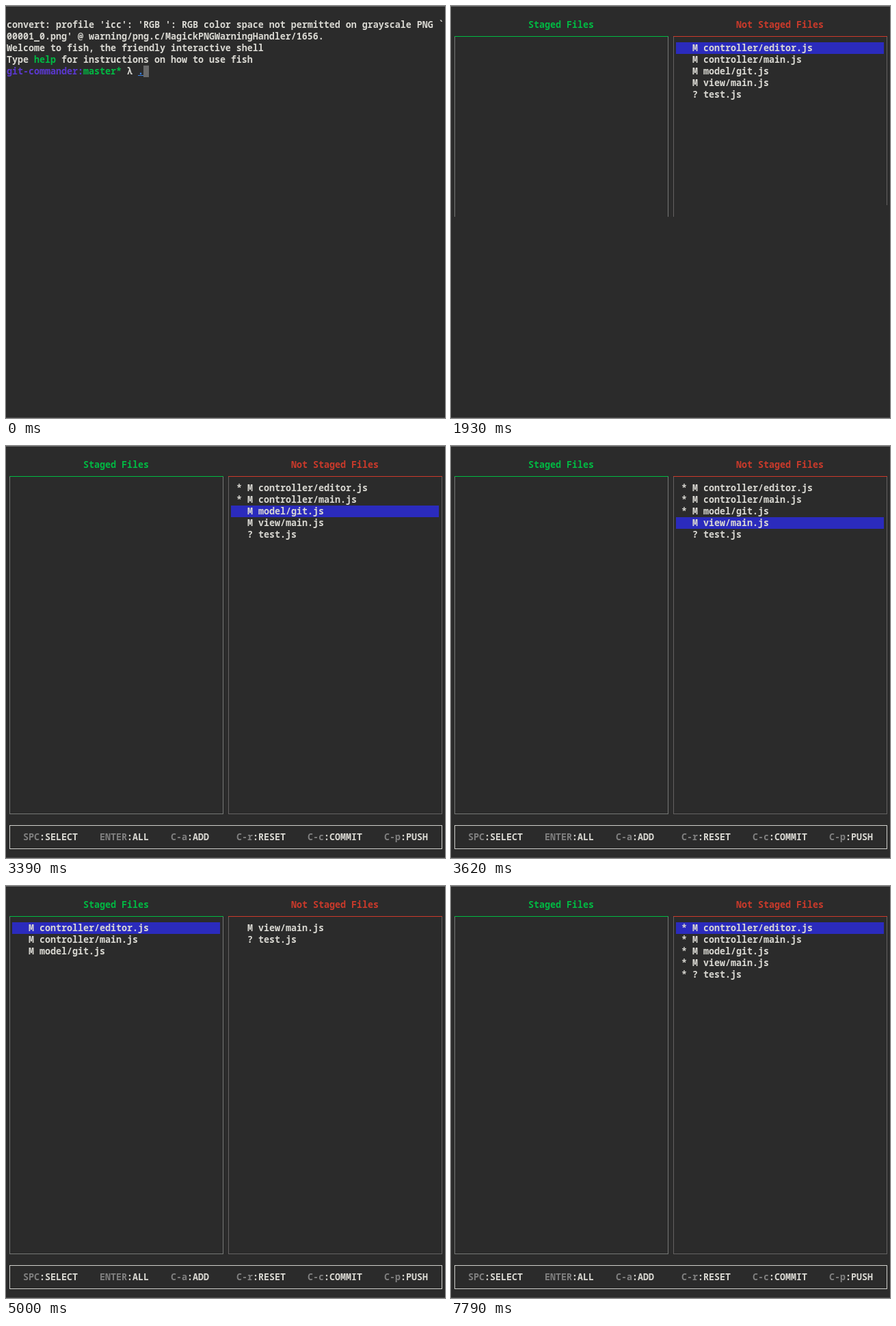
Animation of 642 by 602 pixels, one loop 8 s. Source, as an HTML page:

```html
<!DOCTYPE html>
<html lang="en">
<head>
<meta charset="utf-8">
<title>git-commander in a terminal</title>
<style>
  html, body { margin: 0; width: 100%; height: 100%; overflow: hidden; background: #2b2b2b; }
  svg { display: block; }
  text {
    font: 600 13.333px "Noto Sans Mono", "DejaVu Sans Mono", monospace;
    font-variant-ligatures: none;
    white-space: pre;
  }
</style>
</head>
<body>
<svg id="term" width="642" height="602" viewBox="0 0 642 602"></svg>
<script>
const LOOP = 8000, CW = 8, LH = 17;
const WHITE = '#d9d8d2', GREEN = '#00ba43', RED = '#cb3a2b', BLUE = '#3b82e4',
      PURPLE = '#5b38d0', GREY = '#808080', SELECT = '#2b2bbd', CURSOR = '#6a6a6a';
const term = document.getElementById('term');
const timed = [];

const colX = c => 1 + c * CW;
const rowY = r => 2 + r * LH;

// Adds an SVG element, visible from time a until time b.
function add(tag, attrs, a = 0, b = LOOP) {
  const el = document.createElementNS('http://www.w3.org/2000/svg', tag);
  for (const k in attrs) el.setAttribute(k, attrs[k]);
  term.append(el);
  if (a > 0 || b < LOOP) timed.push({ el, a, b });
  return el;
}

function rect(x, y, width, height, fill, a, b) {
  add('rect', { x, y, width, height, fill }, a, b);
}

function text(col, row, str, fill, a, b) {
  add('text', { x: colX(col), y: rowY(row) + 13, fill }, a, b).textContent = str;
}

function cells(col, row, n, fill, a, b) {
  rect(colX(col), rowY(row), n * CW, LH, fill, a, b);
}

// Window edges
rect(0, 0, 642, 1, '#686868');
rect(0, 601, 642, 1, '#484848');

// Shell
const UI = 1930;
[
  "convert: profile 'icc': 'RGB ': RGB color space not permitted on grayscale PNG `",
  "00001_0.png' @ warning/png.c/MagickPNGWarningHandler/1656.",
  'Welcome to fish, the friendly interactive shell',
  'Type      for instructions on how to use fish'
].forEach((line, i) => text(0, i + 1, line, WHITE, 0, UI));
text(5, 4, 'help', GREEN, 0, UI);
text(0, 5, 'git-commander:', PURPLE, 0, UI);
text(14, 5, 'master*', GREEN, 0, UI);
text(22, 5, 'λ', WHITE, 0, UI);

const command = './bin/git-commander';
function typed(str, cursor, a, b) {
  cells(cursor, 5, 1, CURSOR, a, b);
  text(24, 5, str, BLUE, a, b);
  rect(colX(24), rowY(5) + 14, str.length * CW, 1, BLUE, a, b);
}
typed('.', 25, 0, 100);
typed('./', 26, 100, 210);
typed('./b', 27, 210, 310);
typed(command, 44, 310, 910);
text(24, 5, command, BLUE, 910, UI);
cells(44, 5, 1, CURSOR, 910, 1010);
cells(0, 6, 1, CURSOR, 1010, UI);

// Panels: the lower part appears at FULL
const FULL = 2380;
function panel(x, color, side, rightEnd) {
  const top = 44, bottom = 537, w = 313;
  rect(x, top, 1, 308 - top, side, UI);
  rect(x + w - 1, top, 1, rightEnd - top, side, UI);
  rect(x, top, w, 1, color, UI);
  rect(x, 308, 1, bottom - 307, side, FULL);
  rect(x + w - 1, rightEnd, 1, bottom + 1 - rightEnd, side, FULL);
  rect(x, bottom, w, 1, side, FULL);
}
text(14, 1, 'Staged Files', GREEN, UI);
text(52, 1, 'Not Staged Files', RED, UI);
panel(5, GREEN, '#767876', 308);
panel(325, RED, '#646262', 291);

// Key bar
add('rect', { x: 5.5, y: 554.5, width: 632, height: 34, fill: 'none', stroke: '#cfcfcb' }, FULL);
[
  [3, 'SPC', 'SELECT'], [17, 'ENTER', 'ALL'], [30, 'C-a', 'ADD'],
  [42, 'C-r', 'RESET'], [55, 'C-c', 'COMMIT'], [69, 'C-p', 'PUSH']
].forEach(([col, key, name]) => {
  text(col, 33, key, GREY, FULL);
  text(col + key.length, 33, ':' + name, WHITE, FULL);
});

// File lists
const LEFT = 0, RIGHT = 40;
const files = ['M controller/editor.js', 'M controller/main.js', 'M model/git.js', 'M view/main.js', '? test.js'];
const MARK1 = 2480, MARK2 = 3390, MARK3 = 3620, ADDED = 4340, FOCUS = 5000,
      ALL_LEFT = 6450, RESET = 7090, ALL_RIGHT = 7790;

const select = (side, i, a, b) => cells(side + 1, 3 + i, 38, SELECT, a, b);
const star = (side, i, a, b) => text(side + 2, 3 + i, '*', WHITE, a, b);
const list = (side, names, a, b) => names.forEach((n, i) => text(side + 4, 3 + i, n, WHITE, a, b));

select(RIGHT, 0, UI, MARK1);
select(RIGHT, 1, MARK1, MARK2);
select(RIGHT, 2, MARK2, MARK3);
select(RIGHT, 3, MARK3, ADDED);
select(RIGHT, 0, ADDED, FOCUS);
select(LEFT, 0, FOCUS, RESET);
select(RIGHT, 0, RESET);

list(RIGHT, files, UI, ADDED);
list(LEFT, files.slice(0, 3), ADDED, RESET);
list(RIGHT, files.slice(3), ADDED, RESET);
list(RIGHT, files, RESET);

[MARK1, MARK2, MARK3].forEach((t, i) => {
  star(RIGHT, i, t, ADDED);
  star(LEFT, i, ALL_LEFT, RESET);
});
files.forEach((_, i) => star(RIGHT, i, ALL_RIGHT));

const start = performance.now();
function draw() {
  const t = (performance.now() - start) % LOOP;
  for (const { el, a, b } of timed) el.style.display = t >= a && t < b ? '' : 'none';
  requestAnimationFrame(draw);
}
draw();
</script>
</body>
</html>
```
